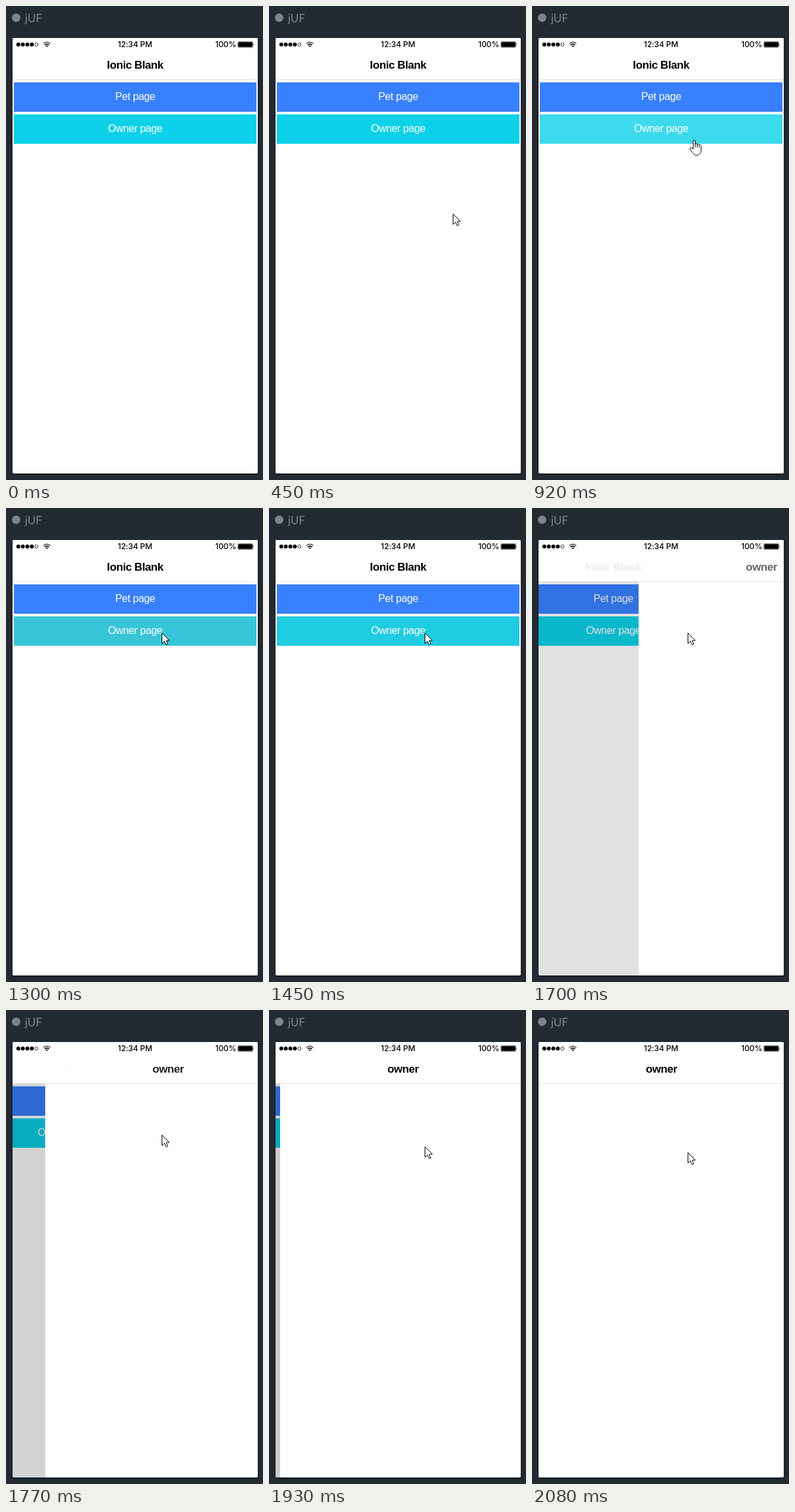
These frames come from a looping animation (393 px wide and 726 px high, 2160 ms). An HTML page:

```html
<!DOCTYPE html>
<html lang="en">
<head>
<meta charset="utf-8">
<title>Page transition</title>
<style>
  html, body { margin: 0; width: 100%; height: 100%; overflow: hidden; background: #242a32; }
  svg { display: block; width: 393px; height: 726px; }
  .mid { text-anchor: middle; }
  .label { font: 16px "Liberation Sans", Arial, sans-serif; letter-spacing: -.4px; fill: #fff; }
  .title { font: bold 17px "Liberation Sans", Arial, sans-serif; letter-spacing: -.4px; }
  .status { font: 500 12px Inter, sans-serif; letter-spacing: -.1px; }
  .phone { filter: drop-shadow(0 1px 1.5px rgba(0, 0, 0, .6)); }
  .cursor { fill: #fff; stroke: #000; stroke-linejoin: round; }
</style>
</head>
<body>
<svg viewBox="0 0 393 726">
  <clipPath id="screen"><rect x="10" y="49" width="375" height="667" rx="2"/></clipPath>

  <circle cx="15.5" cy="18" r="6.5" fill="#7f848a"/>
  <text x="29" y="25" font-family="Lato, sans-serif" font-size="17" fill="#7f848a">jUF</text>
  <rect class="phone" x="10" y="49" width="375" height="667" rx="2" fill="#fff"/>

  <g clip-path="url(#screen)">
    <rect x="10" y="113" width="375" height="603"/>
    <g id="home">
      <rect x="10" y="113" width="375" height="603" fill="#fff"/>
      <rect x="12" y="117" width="371" height="45" fill="#3880ff"/>
      <rect x="12" y="166" width="371" height="45" fill="#0cd1e8"/>
      <rect id="tint" x="12" y="166" width="371" height="45"/>
      <text class="label mid" x="197.5" y="144">Pet page</text>
      <text class="label mid" x="197.5" y="193">Owner page</text>
    </g>
    <rect id="owner" x="10" y="113" width="375" height="603" fill="#fff"/>
    <rect x="10" y="49" width="375" height="64" fill="#fff"/>
    <rect x="10" y="112" width="375" height="1" fill="#e5e5e5"/>
    <text id="homeTitle" class="title mid" x="197.5" y="96">Ionic Blank</text>
    <text id="ownerTitle" class="title mid" x="198" y="96">owner</text>
  </g>

  <!-- status bar -->
  <path d="M18.8 59h0m6.9 0h0m6.9 0h0m6.9 0h0" stroke="#000" stroke-width="6" stroke-linecap="round"/>
  <circle cx="46.5" cy="59" r="2.5" fill="none" stroke="#000" stroke-width=".8"/>
  <g fill="none" stroke="#000" stroke-width="1.6">
    <path d="M57.2 57.6q5.3-4.6 10.6 0" stroke="#555"/>
    <path d="M59.2 59.8q3.3-2.8 6.6 0"/>
    <path d="M60.8 61.2q1.7-1.4 3.4 0L62.5 63z" fill="#000" stroke="none"/>
  </g>
  <text class="status mid" x="197.3" y="63">12:34 PM</text>
  <text class="status" x="320" y="63">100%</text>
  <rect x="354.5" y="54.5" width="23" height="9" rx="1.5" fill="none" stroke="#777" stroke-width=".8"/>
  <rect x="355.2" y="55.2" width="21.6" height="7.6" rx=".7"/>
  <path d="M378.2 57.3q1.6 1.7 0 3.4z"/>

  <path id="arrow" class="cursor" d="M.5.5V16.5L4.2 13 6.7 18.5 9.3 17.4 6.9 12H11.8z"/>
  <path id="hand" class="cursor" d="M-.5 14V2a1.5 1.5 0 0 1 3 0v5a1.5 1.5 0 0 1 3 .7a1.5 1.5 0 0 1 3 .8
    a1.5 1.5 0 0 1 3 1V16c0 5-3 7.5-7 7.5S0 21.5-1.5 19.5L-5 15c-1.5-2.5.5-4 2.5-2.5z
    M2.5 7v4.5M5.5 7.7v4M8.5 8.5v3.5"/>
</svg>
<script>
const LOOP = 2160, FIRST = 207, STEP = 78;
const HOVER = 750, PRESS = 1299, RELEASE = 1450;
const NAV_START = 1576.6, NAV_TIME = 518;
// pointer key points: time, x, y
const path = [[207, 316, 711], [441, 281, 318], [675, 256, 222], [909, 247, 205],
  [1221, 238, 191], [1767, 238, 191], [2079, 238, 218]];
const el = id => document.getElementById(id);
const clamp = v => Math.min(1, Math.max(0, v));
const move = (id, x, y = 0) => el(id).setAttribute("transform", `translate(${x} ${y})`);
const fade = (id, value) => el(id).setAttribute("opacity", value);

// slows down within each stretch
function pointer(t) {
  const i = path.findLastIndex((p, n) => n < path.length - 1 && p[0] <= t);
  const [a, b] = [path[i], path[i + 1]];
  const k = clamp((t - a[0]) / (b[0] - a[0]));
  return [1, 2].map(n => Math.round(a[n] + (b[n] - a[n]) * k * (1.6 - .6 * k)));
}

// cubic-bezier(.36, .66, .04, 1)
function ease(x) {
  if (x <= 0 || x >= 1) return x <= 0 ? 0 : 1;
  const bez = (s, a, b) => 3 * (1 - s) ** 2 * s * a + 3 * (1 - s) * s * s * b + s ** 3;
  let lo = 0, hi = 1;
  for (let i = 0; i < 24; i++) {
    const s = (lo + hi) / 2;
    if (bez(s, .36, .04) < x) lo = s; else hi = s;
  }
  return bez(lo, .66, 1);
}

function draw(now) {
  // the picture holds first, then advances in even steps
  const t = FIRST + STEP * Math.floor((now % LOOP - FIRST) / STEP);
  const p = ease((t - NAV_START) / NAV_TIME);
  const back = -.33 * 375 * p, ahead = Math.round(375 * (1 - p));
  move("home", back);
  fade("home", 1 - .2 * p);
  move("homeTitle", back);
  fade("homeTitle", (1 - p) ** 3);
  move("owner", ahead);
  move("ownerTitle", ahead);
  fade("ownerTitle", p);

  const pointing = t >= HOVER && t < PRESS;
  el("tint").setAttribute("fill", pointing ? "#3ddaed" : "#37c5d7");
  fade("tint", t < HOVER ? 0 : clamp((RELEASE - t) / (RELEASE - PRESS)));

  const [x, y] = pointer(Math.max(t, FIRST));
  move("arrow", x, y);
  move("hand", x, y);
  fade("arrow", t >= FIRST && !pointing ? 1 : 0);
  fade("hand", pointing ? 1 : 0);
}

const start = performance.now();
function tick() {
  draw(performance.now() - start);
  requestAnimationFrame(tick);
}
tick();
</script>
</body>
</html>
```
